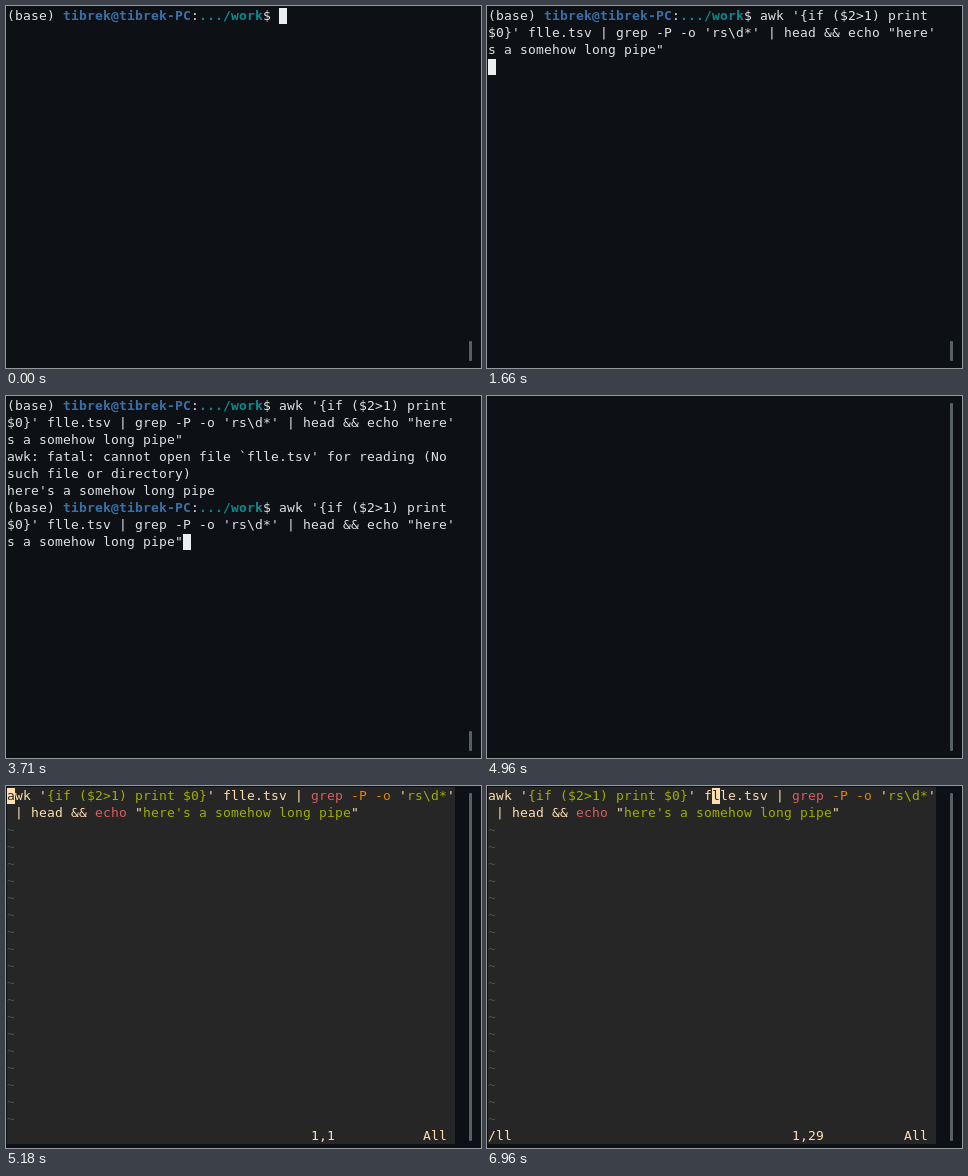
An HTML page that plays this animation: 475 by 362 pixels, repeating every 8 s.

```html
<!DOCTYPE html>
<html lang="en">
<head>
<meta charset="utf-8">
<title>Editing a shell command</title>
<style>
html, body { margin: 0; width: 100%; height: 100%; overflow: hidden; background: #0d1015; }
#term, #cursor {
  position: absolute; white-space: pre; font-variant-ligatures: none;
  font: 13px/17px "DejaVu Sans Mono", monospace;
  letter-spacing: calc(8px - 1ch); /* whole-pixel character cells */
}
#term { left: 1px; top: 1px; width: 448px; height: 357px; color: #dfe3e5; }
#term.vim { background: #262626; color: #ffdfaf; }
#cursor { width: 8px; height: 16px; background: #eceff1; color: #262626; }
#cursor span { position: absolute; left: 0; top: -1px; }
.vim + #cursor { background: #ffdfaf; }
#bar { position: absolute; left: 463px; width: 3px; bottom: 7px; border-radius: 1px; background: #596061; }
.user { color: #3a70a8; }
.path { color: #078b8f; }
.red { color: #d75f5f; }
.green { color: #a0af00; }
.orange { color: #e5820a; }
.dim { color: #4e4e4e; }
</style>
</head>
<body>
<div id="term"></div>
<div id="cursor"><span></span></div>
<div id="bar"></div>
<script>
const LOOP = 8000, CELL = 8, LINE = 17, ROWS = 21;
const $ = id => document.getElementById(id);
const esc = s => s.replace(/&/g, '&amp;').replace(/</g, '&lt;').replace(/>/g, '&gt;');
const paint = (name, s) => `<span class="${name}">${esc(s)}</span>`;

const prompt = '(base) <b class="user">tibrek@tibrek-PC</b>:<b class="path">.../work</b>$ ';
const command = esc(`awk '{if ($2>1) print
$0}' flle.tsv | grep -P -o 'rs\\d*' | head && echo "here'
s a somehow long pipe"`);
const output = `
awk: fatal: cannot open file \`flle.tsv' for reading (No
such file or directory)
here's a somehow long pipe
`;
const typed = prompt + command;
const done = typed + output + prompt;

const buffer = "awk '" + paint('green', '{if ($2>1) print $0}') + "' flle.tsv | " +
  paint('red', 'grep') + ' ' + paint('orange', '-P -o') + " '" + paint('green', 'rs\\d*') + "'\n" +
  ' | head ' + esc('&&') + ' ' + paint('red', 'echo') + ' "' +
  paint('green', "here's a somehow long pipe") + '"\n' + paint('dim', '~\n'.repeat(ROWS - 3));
const ruler = pos => ' '.repeat(38) + pos.padEnd(14) + 'All';

const shell = (html, col, row) => ({ html, col, row });
const vim = (status, col, row, char = '') =>
  ({ html: buffer + status, col, row, char, vim: true, full: true });
const search = s => vim(s, s.length, ROWS - 1);

const steps = [
  [0, shell(prompt, 34, 0)],
  [500, shell(typed, 22, 2)],
  [1660, shell(typed, 0, 3)],
  [1760, shell(done, 34, 6)],
  [3710, shell(done + command, 22, 8)],
  [4960, { html: '', full: true }],
  [4980, { html: '\n'.repeat(ROWS - 1) + '"/tmp/bash-fc.63kRQD" 1L, 101C', full: true }],
  [5180, vim(ruler('1,1'), 0, 0, 'a')],
  [5960, search('/')],
  [6440, search('/l')],
  [6620, search('/ll')],
  [6860, vim('/ll', 28, 0, 'l')],
  [6960, vim('/ll' + ruler('1,29').slice(3), 28, 0, 'l')]
];

let shown;
function show(s) {
  $('term').innerHTML = s.html;
  $('term').className = s.vim ? 'vim' : '';
  const cursor = $('cursor');
  cursor.hidden = s.col === undefined;
  cursor.style.left = 1 + (s.col || 0) * CELL + 'px';
  cursor.style.top = 2 + (s.row || 0) * LINE + 'px';
  cursor.firstChild.textContent = s.char || '';
  $('bar').style.top = s.full ? '7px' : '335px';
}

const start = performance.now();
function frame() {
  const t = (performance.now() - start) % LOOP;
  const state = steps.findLast(([at]) => at <= t)[1];
  if (state !== shown) show(shown = state);
  requestAnimationFrame(frame);
}
frame();
</script>
</body>
</html>
```
